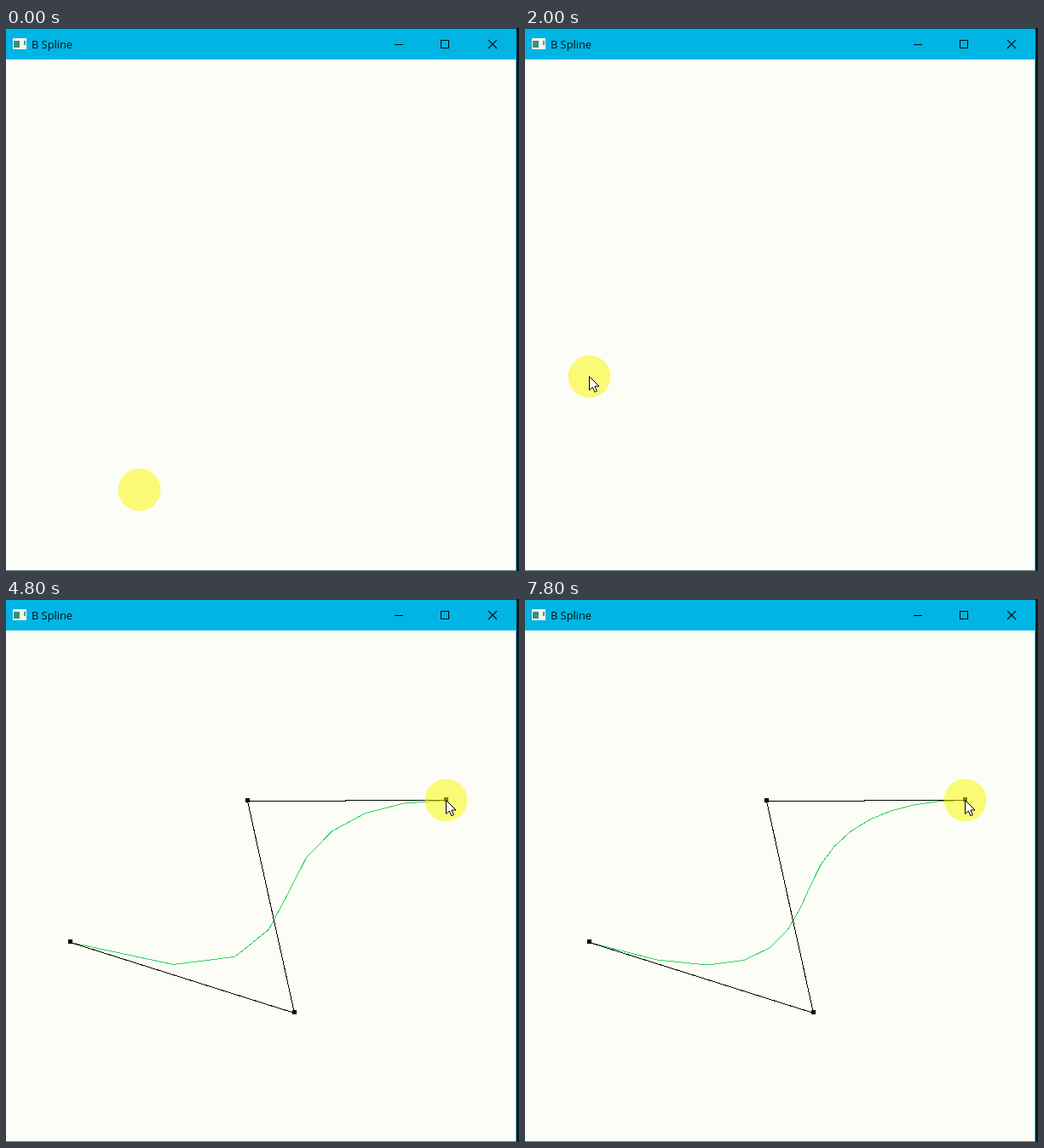
Write an HTML page that moves like this. It is 602 px wide and 638 px high and loops after 8000 ms.

```html
<!DOCTYPE html>
<html lang="en">
<head>
<meta charset="utf-8">
<title>B Spline</title>
<style>
  html, body { margin: 0; width: 100%; height: 100%; overflow: hidden; background: #fdfdf7; }
  svg { display: block; width: 602px; height: 638px; }
  text { font: 12.8px "Open Sans", sans-serif; fill: #001010; }
  .thin { fill: none; stroke: #000; shape-rendering: crispEdges; }
</style>
</head>
<body>
<svg viewBox="0 0 602 638">
  <rect width="602" height="638" fill="#fdfdf7"/>

  <polyline id="curve" class="thin" style="stroke:#2fd45c"/>
  <polyline id="hull" class="thin"/>
  <path id="handles" shape-rendering="crispEdges"/>

  <g id="pointer">
    <circle cx=".5" cy=".5" r="25" fill="#f8f800" fill-opacity=".52"/>
    <path id="arrow" d="M.5 .5V16.5L4.3 13 6.8 18.7 9.4 17.6 6.9 12H12Z" fill="#fff" stroke="#000"/>
  </g>

  <g shape-rendering="crispEdges">
    <rect width="599" height="37" fill="#00b5e4"/>
    <rect width="600" height="1" fill="#123c48"/>
    <rect x="598" y="37" width="1" height="601" fill="#5fb8d4"/>
    <rect x="599" width="3" height="638" fill="#061c26"/>
    <rect y="637" width="599" height="1" fill="#6f7d78"/>
    <rect x="8" y="12" width="16" height="13" fill="#f6f6ea"/>
    <rect x="9" y="15" width="7" height="8" fill="#3c8f75"/>
    <rect x="21" y="15" width="2" height="5" fill="#4b9c8a"/>
    <path class="thin" d="M456 19.5H466M510.5 14.5H519.5V23.5H510.5Z"/>
  </g>
  <path d="M566 14L576 24M576 14L566 24" stroke="#001010" stroke-width="1.1"/>
  <text x="30" y="24">B Spline</text>
</svg>

<script>
const LOOP = 8000, TICK = 200, REFINE_FROM = 6800;
const $ = id => document.getElementById(id);

// The pointer reaches each control at the given time and clicks one tick later
const controls = [
  { time: 2200, x: 75, y: 403 }, { time: 2600, x: 338, y: 486 },
  { time: 3000, x: 283, y: 237 }, { time: 3800, x: 516, y: 236 }
];
const [first, , , last] = controls;

const route = [
  { time: 0, x: 156, y: 542 }, { time: 600, x: 282, y: 538 },
  { time: 1400, x: 125, y: 537 }, { time: 2000, x: 75, y: 409 },
  ...controls
];

// The spline as two cubic pieces that meet at the joint
const joint = { x: 347, y: 311 }, JOINT_AT = 8 / 15;
const pieces = [
  [first, { x: 315, y: 479 }, { x: 310, y: 374 }, joint],
  [joint, { x: 380, y: 256 }, { x: 444, y: 236 }, last]
];

const mix = (a, b, k) => ({ x: a.x + (b.x - a.x) * k, y: a.y + (b.y - a.y) * k });
const smooth = k => k * k * (3 - 2 * k);
const toPoints = list => list.map(p => `${p.x + .5},${p.y + .5}`).join(" ");

// De Casteljau
function bezier(points, k) {
  if (points.length === 1) return points[0];
  return bezier(points.slice(1).map((p, i) => mix(points[i], p, k)), k);
}

function splineAt(u) {
  return u < JOINT_AT
    ? bezier(pieces[0], u / JOINT_AT)
    : bezier(pieces[1], (u - JOINT_AT) / (1 - JOINT_AT));
}

function curveAt(t) {
  if (t <= last.time) return [];
  const refined = Math.max(0, (t - REFINE_FROM) / 1000);
  const segments = Math.round(9 + 6 * refined);
  return Array.from({ length: segments + 1 }, (_, i) => splineAt(i / segments));
}

function pointerAt(t) {
  const i = route.findIndex(key => key.time > t);
  if (i < 0) return last;
  const from = route[i - 1], to = route[i];
  return mix(from, to, smooth((t - from.time) / (to.time - from.time)));
}

function draw() {
  const t = Math.floor(performance.now() % LOOP / TICK) * TICK;
  const placed = controls.filter(c => c.time + TICK <= t);
  const { x, y } = pointerAt(t);
  $("hull").setAttribute("points", toPoints(placed));
  $("curve").setAttribute("points", toPoints(curveAt(t)));
  $("handles").setAttribute("d", placed.map(p => `M${p.x - 2} ${p.y - 3}h5v5h-5z`).join(""));
  $("pointer").setAttribute("transform", `translate(${Math.round(x)} ${Math.round(y)})`);
  $("arrow").style.display = t ? "" : "none";
  requestAnimationFrame(draw);
}
draw();
</script>
</body>
</html>
```
